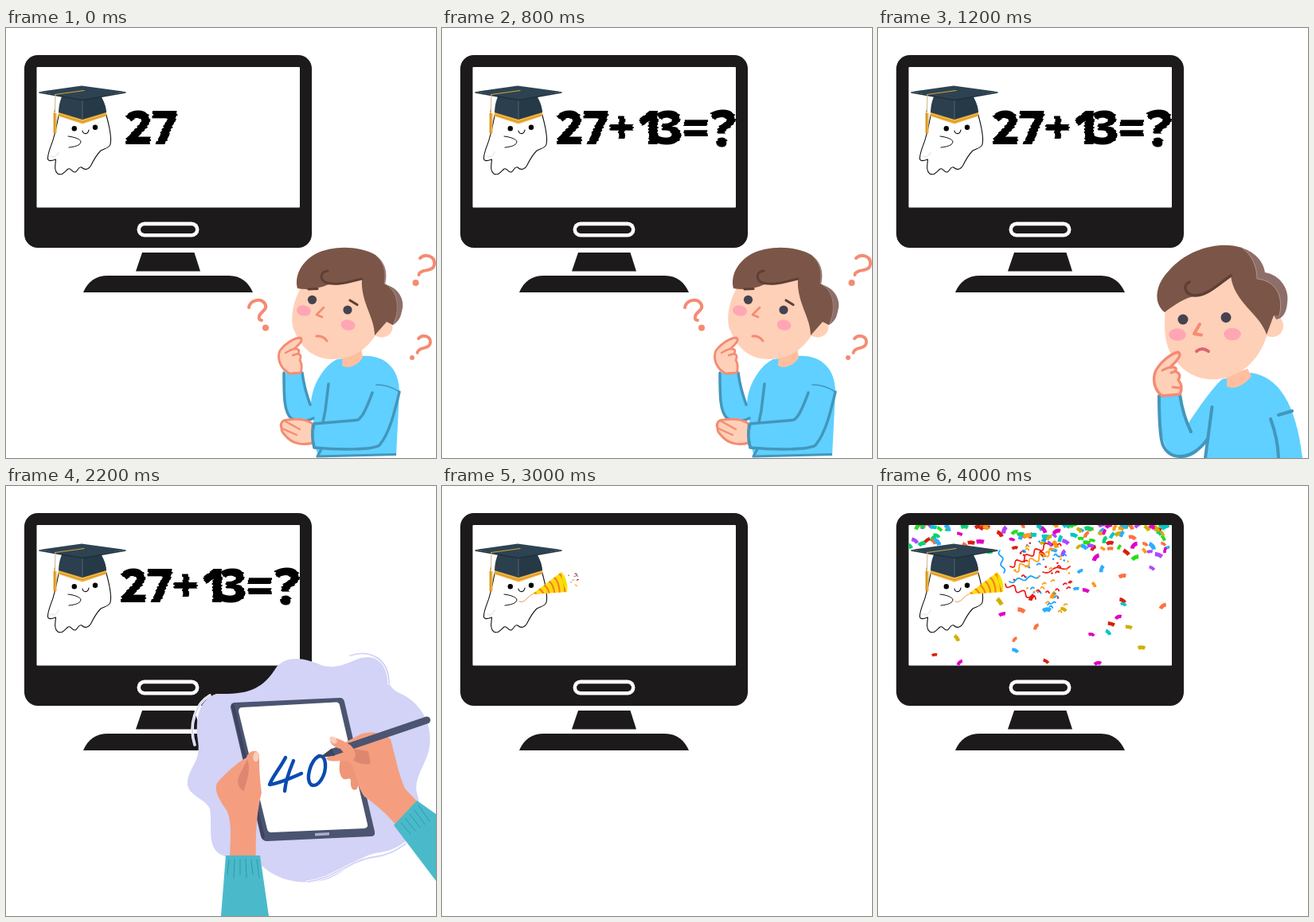
An HTML page with a canvas that plays this animation: 540 by 540 pixels, repeating every 4.4 s.

```html
<!DOCTYPE html>
<html lang="en">
<head>
<meta charset="utf-8">
<title>Sum on a screen</title>
<style>
html, body { margin: 0; width: 100%; height: 100%; overflow: hidden; background: #fff; }
canvas { display: block; width: 100vw; height: 100vh; }
</style>
</head>
<body>
<canvas id="stage" width="540" height="540"></canvas>
<script>
const ctx = document.getElementById('stage').getContext('2d');
const LOOP = 4400;
const INK = '#1c1a1b', SKIN = '#ffd0b8', CORAL = '#f58b72', HAIR = '#7b5648', HAIR_BACK = '#8e6e69';
const SHIRT = '#5fd0ff', SEAM = '#4496bb', BLUSH = '#ffa6b4', EYE = '#46424f';
const TEAL = '#4abacb', HAND = '#f49e7f', HAND_SHADE = '#de8770', SLATE = '#4b5470', LILAC = '#d2d3f6';
const PARTY = ['#d81f0c', '#e000c4', '#2aaeff', '#2bdc1c', '#ff9a14', '#d0b000', '#b045ff', '#ff7040', '#00c8c8', '#08d070'];

function fill(d, color) {
  ctx.fillStyle = color;
  ctx.fill(new Path2D(d));
}
function line(d, color, width, cap = 'round') {
  ctx.strokeStyle = color;
  ctx.lineWidth = width;
  ctx.lineCap = cap;
  ctx.lineJoin = 'round';
  ctx.stroke(new Path2D(d));
}
function shape(d, color, edge, width) {
  fill(d, color);
  line(d, edge, width);
}
function oval(x, y, rx, ry, color, turn = 0) {
  ctx.fillStyle = color;
  ctx.beginPath();
  ctx.ellipse(x, y, rx, ry, turn, 0, 7);
  ctx.fill();
}
const dot = (x, y, r, color) => oval(x, y, r, r, color);
function box(x, y, w, h, r, color) {
  ctx.fillStyle = color;
  ctx.beginPath();
  ctx.roundRect(x, y, w, h, r);
  ctx.fill();
}
function seeded(seed) {
  return () => {
    seed = (seed * 1664525 + 1013904223) >>> 0;
    return seed / 4294967296;
  };
}

function monitor() {
  box(23, 34, 361, 242, 17, INK);
  box(38.5, 49, 330.5, 176.5, 1, '#fff');
  box(164.5, 243.5, 78, 19, 9.5, '#fff');
  box(169, 248.2, 69, 9.8, 4.9, INK);
  fill('M171 282H236.500L244 305.500H163Z', INK);
  fill('M97 332C103 318 113 311 128 311H280C295 311 305 320 310 332Z', INK);
}

function ghost() {
  shape('M67 106C64 119 63 128 60 137C58 146 53 154 52.500 163C52 168 57 167 62.500 165C62 172 60 179 65 183C71 186 74 180 78 177C82 175 83 182 87 181C91 179 91 173 95 175C99 179 104 178 107 172C110 166 115 158 119 154C124 151 130 151 131 146C133 138 129 120 125 106Z', '#fff', '#111', 1.1);
  line('M57 161C61 163 65 160 66 156', '#eee', 2);
  dot(85.8, 126.3, 3.2, '#000');
  dot(112, 124.8, 3.2, '#000');
  line('M96 129C97 134 103 134 104 128', '#111', 1.2);
  line('M78 136C87 137 94 140 94 143C93 148 86 149 79 150', '#111', 1);
  fill('M71 84C67 93 66 100 66 109L96 117L126 109C126 98 122 90 118 84Z', '#2b3f4e');
  fill('M96 88L96 117L126 109C126 98 122 90 118 84Z', '#263947');
  line('M96 91V114', '#53636e', 1);
  fill('M66 106L96 115L126 106V110.500L96 120.500L65.500 110.500Z', '#f0b33f');
  line('M66 109L96 118L126 109', '#c98a24', .8);
  fill('M42 80L95 72.500L150 80L96 91Z', '#2e4352');
  line('M42 81L96 90.500L150 81', '#1e303d', 1.5);
  line('M98 78.500L62 83.500', '#d3a13e', 1.2);
  line('M62 83.500L61.500 106', '#c9b48a', 1);
  line('M61.500 107V132', '#efae35', 4, 'butt');
  line('M60.800 103V133', '#b9802b', .8);
}

// Each pixel row is nudged sideways for a dry-brush edge.
function brush(parts) {
  const rnd = seeded(9);
  ctx.fillStyle = '#000';
  for (let y = 94; y < 158; y += 2) {
    const nudge = (rnd() - .5) * 2;
    ctx.save();
    ctx.beginPath();
    ctx.rect(38, y, 331, 2);
    ctx.clip();
    for (const [text, x, base = 146, size = 59] of parts) {
      ctx.font = `800 ${size}px "Open Sans", "Noto Sans", sans-serif`;
      ctx.letterSpacing = '-1.5px';
      ctx.fillText(text, x + nudge, base);
    }
    ctx.restore();
  }
}
function sum(t) {
  if (t < 400) return brush([['27', 149]]);
  const parts = [['27', 143], ['+', 209], ['1', 244], ['3', 268]];
  if (t >= 800) parts.push(['=', 302], ['?', 337, 149, 64]);
  brush(parts);
}

function worried() {
  line('M305 351C307 341 320 339 325 346C330 354 319 356 318 362C317 366 319 367 321 367', CORAL, 4);
  dot(326, 376.5, 4, CORAL);
  line('M520 289C526 283 538 286 538 295.500C538 304 529 304 524 305C520 307 518 308 518.500 310', CORAL, 4);
  dot(514.5, 320, 4, CORAL);
  line('M518 390C523 384 533 387 533 394.500C532 402 525 401 521 403C517 405 517 406 516.500 408', CORAL, 3.8);
  dot(510, 414, 3, CORAL);

  fill('M349 433L372 434C375 450 380 462 383 472C384 448 400 423 416 416L445 412C473 409 494 425 494 457L490 537H392L386 520V492Q365 500 355 485C348 468 348 450 349 433Z', SHIRT);
  fill('M423 405L446 402L448 414C440 426 428 428 422 424Z', '#ffbf9f');
  line('M349 433C349 462 349 482 358 490Q370 498 386 490', SEAM, 3.5);
  line('M372 433C374 449 378 462 382 473', SEAM, 3.5);
  line('M405 447L401 480L398 495', SEAM, 3.5);
  line('M460 458C452 480 446 492 440 492.500L387 497Q383 512 387 527C420 530 460 530 469 524C482 508 488 482 494 457', SEAM, 3.5);
  line('M465 448Q481 448 494 457', SEAM, 1.6);
  line('M396 529L391 538L490 535.500', SEAM, 3.2, 'butt');
  shape('M385 497C375 490 362 491 354 492C346 492 344 498 346 502C345 507 349 510 352 513C360 523 375 524 385 521Z', SKIN, CORAL, 3);
  line('M351 494L369 504M347 503L365 511', CORAL, 2.4);
  line('M386 498Q383 512 387 526', SEAM, 3.5);

  fill('M474 368C482 365 487 371 485 379C482 388 472 391 463 386Z', SKIN);
  fill('M371 325C359 345 356 370 363 382C372 405 390 416 410 416C436 416 456 402 466 382L450 316Z', SKIN);
  fill('M455 281C473 287 481 303 476 322C493 326 502 342 497 356C495 367 490 370 486 373L470 340Z', HAIR_BACK);
  fill('M366 327C362 311 371 294 388 284C410 273 442 273 464 285C475 295 477 309 475 321C492 328 497 352 486 373L478 369L463 386C463 363 445 344 447 315C434 319 422 322 405 322C392 328 378 329 366 327Z', HAIR);
  line('M466 287C477 297 477 309 475 321C491 328 496 350 487 371', '#b19b94', .7);
  line('M404 305C395 306 394 314 400 319C414 325 433 318 447 315', '#5e4035', 3);
  line('M380 328L391 327.500M432 342L441 347.500', '#5e4035', 3.2);
  dot(384.5, 341.3, 5.6, EYE);
  dot(429, 354, 5.6, EYE);
  oval(374, 355, 9, 6.7, BLUSH, .15);
  oval(429.5, 373, 9, 6.7, BLUSH, .15);
  line('M399 351L390 360L397 363', CORAL, 2.8);
  line('M390 387Q398 386 403 393', CORAL, 3);
  shape('M356 434C344 427 340 415 344 405C350 397 361 389 370 389C374 393 366 399 362 403Q370 402 367 409Q372 411 369 417Q373 424 370 433Z', SKIN, CORAL, 2.8);
  line('M351 408Q359 403 363 403M360 411L367 409', CORAL, 2.4);
}

function thinking(happy) {
  fill('M353 462L379 460C381 475 388 490 390 496C402 478 419 453 432 441L469 433C502 438 525 470 533 540H410L412 518C400 540 385 543 372 537C355 530 353 490 353 462Z', SHIRT);
  fill('M438 436L464 428L469 437C460 449 447 455 438 450Z', '#ffbf9f');
  line('M353 462C353 485 354 505 356 517C361 546 395 544 413 517', SEAM, 4);
  line('M379 460C382 480 387 495 393 507M419.500 476L411 540M493 491Q502 515 503 540M503 486L520 481', SEAM, 4);
  oval(495, 374, 14, 14, SKIN);
  fill('M361 352C358 380 361 400 370 412C383 434 405 443 426 441C458 438 482 414 490 380L444 308Z', SKIN);
  fill('M453 275C473 280 484 293 486 307C505 310 517 328 514 345C513 358 508 365 500 366L480 330Z', HAIR_BACK);
  fill('M360 357C345 345 348 322 366 304C390 276 432 267 457 276C469 284 476 300 476 315C500 317 510 338 504 361L497 361L488 385C479 358 447 345 443 311C425 326 410 336 398 337C386 338 372 348 360 357Z', HAIR);
  line('M457 276C470 285 476 300 476 315C500 317 510 338 504 361', '#b9a49d', .8);
  line('M391 319C382 323 385 335 398 336C413 336 426 323 443 311', '#5e4035', 3.6);
  dot(383, 366, 6.5, EYE);
  dot(437, 363.5, 6.5, EYE);
  oval(376, 385, 10.8, 7.8, BLUSH);
  oval(445, 384.5, 10.8, 7.8, BLUSH);
  line('M404 372L397 384L406 385.500', CORAL, 4);
  line(happy ? 'M399.500 403Q408 409 415 402' : 'M400 406Q407 400 415 406', '#dc6472', 4);
  shape('M357 462C347 455 344 441 349 430C356 418 368 409 377 407C383 411 373 420 367 426Q377 425 373 431Q382 434 377 442Q384 450 379 460Z', SKIN, CORAL, 3.4);
  line('M357 430Q364 426 369 426M368 433L374 431M370 451L379 452', CORAL, 3);
}

function bulb() {
  const gold = '#ffd200';
  for (let k = -1; k < 10; k++) {
    const a = Math.PI + k * Math.PI / 8, c = Math.cos(a), s = Math.sin(a);
    const [r, q] = k % 2 ? [39, 47] : [45, 62.5];
    line(`M${432.5 + c * r} ${214 + s * r}L${432.5 + c * q} ${214 + s * q}`, gold, 3.3);
  }
  fill('M417 244C417 230 407 226 407 212C407 198 418 188 432.500 188C447 188 458 198 458 212C458 226 448 230 448 244Z', gold);
  line('M432 196C442 196 450 203 450 213', '#fff', 3.6, 'butt');
  box(417, 243.5, 31, 5, 2, '#55565b');
  box(418, 249, 29, 5, 2, '#44454a');
  box(419, 254.5, 27, 5, 2, '#55565b');
  fill('M424 259H441L438 263H427Z', '#44454a');
}

function tablet() {
  fill('M340 227C353 212 376 216 396 225C428 234 440 208 464 217C486 230 472 250 494 260C522 272 538 302 531 332C526 352 512 366 516 386C530 430 500 456 470 460C438 464 425 490 395 496C366 501 340 493 325 480C310 465 292 468 275 465C250 457 260 430 256 405C250 392 225 388 228 370C232 350 245 345 241 320C237 290 243 268 264 261C304 262 322 256 340 227Z', LILAC);
  for (const d of ['M432 213C458 205 481 217 481 248', 'M237 325C229 300 238 273 256 263', 'M379 497C410 494 432 470 462 466C480 464 492 457 502 449']) {
    line(d, '#fff', 3.6);
    line(d, LILAC, 1.8);
  }
  fill('M287 272L419 266Q424 266 425 271L463 434Q464 440 458 440L328 446Q322 446 320 440L282 278Q282 272 287 272Z', SLATE);
  line('M285 276L323 441', '#3c4461', 4);
  fill('M297 278L414 271.500Q418 271 419 275L454 425Q455 429 450 430L333 435Q329 435 328 431L292 283Q292 278 297 278Z', '#fff');
  fill('M388 436L406 435V438.500L388 439.500Z', '#a9aec8');
  line('M351 341C345 353 334 366 331 375C345 373 359 366 371 361M361 345C356 357 351 371 350 383', '#0a4bb0', 4.4);
  line('M393 339C382 345 376 368 383 375C392 380 402 363 401 349C400 339 395 336 388 343', '#0a4bb0', 4.4);

  fill('M281 468C282 440 284 422 277 407C264 389 262 380 265 373C278 358 290 348 302 341C304 333 316 329 318 338C318 365 320 375 321 385C316 405 313 430 314 468Z', HAND);
  fill('M303 343C298 355 291 364 291 372C292 380 298 383 299 383C302 370 308 357 303 343Z', HAND_SHADE);
  oval(314, 340, 3.8, 6.2, '#fbcdbb', .1);
  fill('M276 464H319L330 540H270Z', TEAL);
  for (let i = 0; i < 6; i++) line(`M${280 + i * 7} 469L${278 + i * 8} ${488 + i % 2 * 4}`, '#3199ac', 1);

  fill('M422 336C416 354 419 365 424 368C430 369 432 365 433 370C432 381 437 384 441 380C444 372 447 362 442 345Z', '#ee9677');
  fill('M424 323L447 311C459 308 472 309 483 318C489 340 493 362 501 380L518 398L491 427C478 412 465 400 450 390C441 378 440 362 434 350L423 340Z', HAND);
  fill('M428 329L455 333L458 349C445 351 437 346 429 339Z', HAND_SHADE);
  fill('M402 342C407 336 418 335 427 331L438 338C438 346 430 346 420 345C411 346 404 346 402 342Z', HAND);
  line('M411 334L528.500 294', SLATE, 9);
  fill('M393 341.500L409 329.500L413 338.500Z', '#3c4461');
  fill('M407 318C411 313 422 319 432 325C439 331 441 339 436 344C429 341 424 335 420 330C414 329 406 324 407 318Z', HAND);
  oval(411, 319, 5.4, 3.6, '#fbcdbb', .7);
  fill('M516 395L540 412V496L487 426Z', TEAL);
  for (let i = 0; i < 5; i++) line(`M${496 + i * 5.5} ${423 - i * 5.5}L${508 + i * 6} ${437 - i * 4}`, '#3199ac', 1);
}

function popper() {
  line('M97 145C104 148 106 139 114 136', '#f08a3c', .9);
  const cone = 'M113 136L150 108Q158 119 157 133Z';
  fill(cone, '#ffdc10');
  ctx.save();
  ctx.clip(new Path2D(cone));
  for (let i = 0; i < 6; i++) {
    const x = 117 + i * 6.5, y = 133 - i * 4.5;
    line(`M${x - 2} ${y}Q${x + 5} ${y + 5} ${x + 5} 140`, '#f58220', 2.2);
  }
  ctx.restore();
  fill('M150 108Q159 118 157 133Q150 121 150 108Z', '#f4e400');
}

function wave(x, y, dx, dy, amp, turns, color, s) {
  const len = Math.hypot(dx, dy);
  let d = '';
  for (let i = 0; i <= 40; i++) {
    const u = i / 40, w = Math.sin(u * turns * 2 * Math.PI) * amp / len;
    d += `${i ? 'L' : 'M'}${155 + s * (x - 155 + dx * u - dy * w)} ${118 + s * (y - 118 + dy * u + dx * w)}`;
  }
  line(d, color, .8 + .9 * s);
}
function burst(s) {
  const red = '#f01818', blue = '#10a0ff', orange = '#ffa012';
  if (s > .3) {
    wave(166, 101, 48, -28, 3, 4, red, s);
    wave(153, 81, 5, 28, 2, 2, blue, s);
    wave(171, 106, 50, -26, 4, 4, orange, s);
    wave(165, 120, 38, -7, 2, 2.5, blue, s);
    wave(160, 123, 38, 19, 3, 3, red, s);
    wave(207, 108, 34, -7, 2, 1.5, red, s);
  }
  const rnd = seeded(41), size = .5 + .5 * s;
  for (let i = 0; i < 70 * s - 3; i++) {
    const a = -1.05 + rnd() * 1.65, r = 12 + 76 * Math.sqrt(rnd());
    const x = 155 + Math.cos(a) * r * s, y = 118 + Math.sin(a) * r * s * .85;
    const color = [red, blue, orange][i % 3];
    if (i % 2) dot(x, y, 1.3 * size, color);
    else line(`M${x} ${y}q${2 * size} ${-3 * size} ${4 * size} ${1 - i % 4}`, color, 1.8 * size);
  }
}

// x, y and palette index
const FALLING = [
  [99, 191, 5], [71, 212, 0], [103, 222, 1], [172, 193, 7], [172, 207, 2], [211, 220, 0], [199, 177, 7],
  [180, 156, 7], [156, 161, 1], [153, 145, 5], [212, 156, 2], [233, 155, 5], [193, 140, 0], [220, 137, 4],
  [268, 187, 1], [289, 184, 8], [293, 173, 0], [302, 165, 1], [315, 177, 5], [276, 223, 1], [331, 203, 5],
  [358, 151, 7], [307, 144, 0], [308, 149, 8], [261, 131, 1], [271, 124, 4], [249, 129, 2], [307, 113, 7],
  [344, 103, 6], [281, 104, 2], [254, 107, 2], [274, 90, 1], [323, 90, 3], [312, 83, 0]
];
function rain(drop) {
  const rnd = seeded(77);
  function piece(x, y, color) {
    const size = .7 + rnd() * .35;
    ctx.save();
    ctx.translate(x, y);
    ctx.rotate((rnd() - .5) * 2.4);
    ctx.scale(size, size);
    line(`M-4.500 1Q0 ${-3 * rnd()} 4.500 0`, PARTY[color], 5, 'butt');
    ctx.restore();
  }
  ctx.save();
  ctx.beginPath();
  ctx.rect(38.5, 49, 330.5, 176.5);
  ctx.clip();
  for (let i = 0; i < 120; i++) {
    piece(38 + rnd() * 331, 49 + 38 * Math.pow(rnd(), 2) * (.5 + drop / 2), i % 10);
  }
  for (const [x, y, c] of FALLING) piece(x, 49 + (y - 49) * drop, c);
  ctx.restore();
}

function draw(t) {
  ctx.fillStyle = '#fff';
  ctx.fillRect(0, 0, 540, 540);
  monitor();
  if (t >= 3800) rain(t < 4000 ? .5 : 1);
  ghost();
  if (t < 3000) {
    sum(t);
    if (t < 1200) worried();
    else if (t < 2200) {
      if (t >= 1600) bulb();
      thinking(t >= 1600);
    } else tablet();
  } else {
    burst(t < 3400 ? .17 : t < 3600 ? .45 : t < 3800 ? .92 : 1);
    popper();
  }
}

const start = performance.now();
function tick() {
  draw((performance.now() - start) % LOOP);
  requestAnimationFrame(tick);
}
tick();
</script>
</body>
</html>
```
